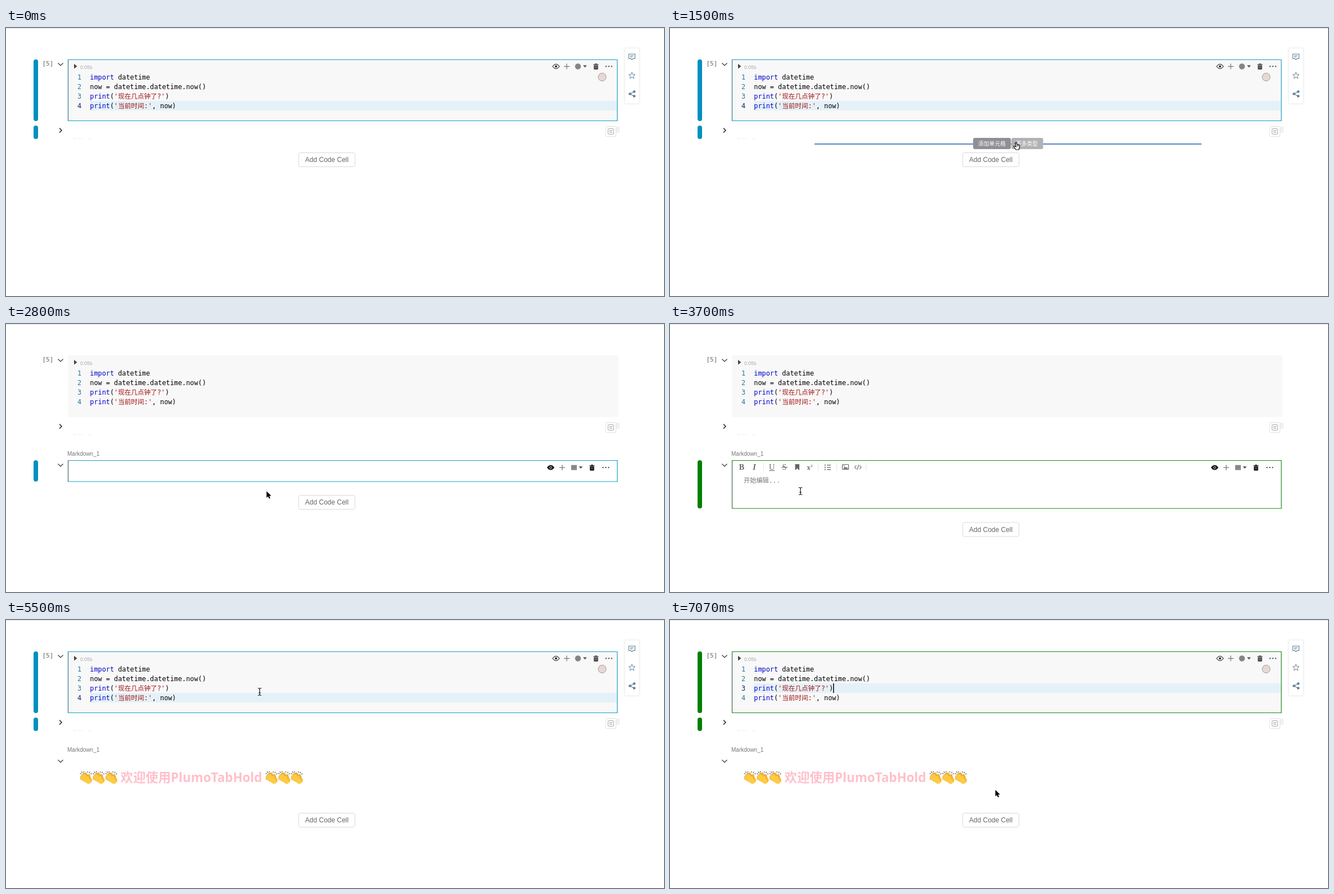
These frames come from a looping animation (1170x478 px, 7230 ms). An HTML page with a canvas:

```html
<!DOCTYPE html>
<html lang="zh">
<head>
<meta charset="utf-8">
<style>
html, body { margin: 0; width: 100%; height: 100%; overflow: hidden; background: #fff; }
canvas { display: block; width: 1170px; height: 478px; }
</style>
</head>
<body>
<canvas id="stage"></canvas>
<script>
const W = 1170, H = 478, LOOP = 7230;
const BLUE = '#0090c0', GREEN = '#008000', GRAY = '#666';
const SANS = '"Liberation Sans", sans-serif';
const MONO = '"DejaVu Sans Mono", monospace';
const SERIF = '"Liberation Serif", serif';
const CJK = '"Noto Sans CJK SC", "Noto Sans CJK", sans-serif';
const NAME = 'PlumoTabHold';

const canvas = document.getElementById('stage');
const g = canvas.getContext('2d');
const dpr = window.devicePixelRatio || 1;
canvas.width = W * dpr;
canvas.height = H * dpr;

// ---------- drawing helpers ----------
function text(s, x, y, font, color, align = 'left') {
  g.font = font;
  g.fillStyle = color;
  g.textAlign = align;
  g.fillText(s, x, y);
  return x + g.measureText(s).width;
}

// Latin and Chinese runs in one line; returns the end x.
function mixed(s, x, y, color, latin, cjk) {
  for (const part of s.split(/([\u3000-\u9fff]+)/)) {
    if (part) x = text(part, x, y, /[\u3000-\u9fff]/.test(part) ? cjk : latin, color);
  }
  return x;
}

function rect(x, y, w, h, color) {
  g.fillStyle = color;
  g.fillRect(x, y, w, h);
}

function box(x, y, w, h, r, fill, stroke, lw = 1) {
  g.beginPath();
  g.roundRect(x, y, w, h, r);
  if (fill) { g.fillStyle = fill; g.fill(); }
  if (stroke) { g.strokeStyle = stroke; g.lineWidth = lw; g.stroke(); }
}

function path(points, color, lw, fill) {
  g.beginPath();
  points.forEach(([x, y], i) => i ? g.lineTo(x, y) : g.moveTo(x, y));
  if (fill) { g.closePath(); g.fillStyle = fill; g.fill(); }
  if (color) { g.strokeStyle = color; g.lineWidth = lw; g.stroke(); }
}

function disc(x, y, r, fill, stroke, lw = 1) {
  g.beginPath();
  g.arc(x, y, r, 0, Math.PI * 2);
  if (fill) { g.fillStyle = fill; g.fill(); }
  if (stroke) { g.strokeStyle = stroke; g.lineWidth = lw; g.stroke(); }
}

function at(x, y, scale, draw) {
  g.save();
  g.translate(x, y);
  g.scale(scale, scale);
  draw();
  g.restore();
}

// ---------- icons ----------
const chevronDown = y => path([[92.5, y - 2], [97, y + 2.5], [101.5, y - 2]], '#333', 1.2);
const chevronRight = y => path([[95, y - 4], [99, y], [95, y + 4]], '#222', 1.5);

function eye(x, y, solid) {
  g.beginPath();
  g.moveTo(x - 6, y);
  g.quadraticCurveTo(x, y - 8, x + 6, y);
  g.quadraticCurveTo(x, y + 8, x - 6, y);
  if (solid) { g.fillStyle = '#111'; g.fill(); }
  g.strokeStyle = '#222';
  g.lineWidth = 1.2;
  g.stroke();
  disc(x, y, 1.9, solid ? '#111' : '#222', solid ? '#fff' : null, .8);
}

function trash(x, y, color) {
  rect(x - 4.5, y - 4, 9, 1.4, color);
  rect(x - 1.7, y - 5.2, 3.4, 1.5, color);
  box(x - 3.8, y - 2, 7.6, 7.4, 1, color);
  rect(x - 1.6, y - .5, .7, 4, '#bbb');
  rect(x + .9, y - .5, .7, 4, '#bbb');
}

function actions(xs, y, markdown) {
  const [e, p, lang, tri, bin, dots] = xs;
  eye(e, y, markdown);
  path([[p - 5, y], [p + 5, y]], '#666', 1.1);
  path([[p, y - 5], [p, y + 5]], '#666', 1.1);
  if (markdown) box(lang - 5, y - 4.5, 10, 9, 0, '#888');
  else disc(lang, y, 5.2, '#858585');
  path([[tri - 3.5, y - 2], [tri + 3.5, y - 2], [tri, y + 2]], null, 0, '#555');
  trash(bin, y, markdown ? '#111' : '#444');
  for (let i = -1; i < 2; i++) disc(dots + i * 5, y, 1.15, '#444');
}

function sidePanel() {
  const c = '#5f7f95';
  g.save();
  g.shadowColor = 'rgba(0,0,0,.08)';
  g.shadowBlur = 4;
  box(1100, 36, 26, 99, 2, '#fff');
  g.restore();
  box(1100, 36, 26, 99, 2, null, '#eee');
  path([[1107.5, 46.5], [1118.5, 46.5], [1118.5, 54.5], [1115, 54.5], [1113, 56.5],
    [1111, 54.5], [1107.5, 54.5], [1107.5, 46]], c, 1.1);
  path([[1110, 49.5], [1116, 49.5]], c, 1);
  path([[1110, 51.7], [1114, 51.7]], c, 1);
  const star = Array.from({ length: 11 }, (_, i) => {
    const r = i % 2 ? 2.8 : 6, a = i * Math.PI / 5 - Math.PI / 2;
    return [1113 + r * Math.cos(a), 85 + r * Math.sin(a)];
  });
  path(star, c, 1);
  path([[1117, 113.5], [1109.5, 117.5], [1117, 121.5]], c, 1.2);
  for (const [x, y] of [[1117, 113.5], [1109.5, 117.5], [1117, 121.5]]) disc(x, y, 2.3, c);
}

// Clapping hands inside a 22-unit square.
function clap(x, y, size) {
  at(x, y, size / 22, () => {
    g.lineCap = 'round';
    const hand = (dx, dy, fill, edge) => {
      const fingers = [[2.5, 12], [3, 8.8], [5.2, 6.4], [8.2, 5.6]];
      for (const [lw, c] of [[4, edge], [2.9, fill]]) {
        fingers.forEach(([fx, fy], i) =>
          path([[fx + dx, fy + dy], [12 + dx + i, 17 + dy - i]], c, lw));
        path([[14 + dx, 8.5 + dy], [15.5 + dx, 14 + dy]], c, lw);
      }
      g.beginPath();
      g.ellipse(14 + dx, 16 + dy, 6, 4.6, .75, 0, Math.PI * 2);
      g.fillStyle = fill;
      g.fill();
    };
    hand(2, -1, '#f5b52e', '#d9921e');
    hand(0, 1, '#ffcb45', '#e6a32b');
    for (const [a, b, c, d] of [[1, 4, 2.6, 5], [3.4, 1, 4.6, 2.8], [7, .6, 7.2, 2.2],
      [14, .8, 13.5, 2.4], [17.6, 1.6, 16.6, 3.2], [20.8, 4.4, 19.2, 5.2]])
      path([[a, b], [c, d]], '#555', 1.1);
    g.lineCap = 'butt';
  });
}

const claps = (x, y, size, step) => { for (let i = 0; i < 3; i++) clap(x + i * step, y, size); };

// ---------- page parts ----------
function addButton(y) {
  box(520.5, y + .5, 100, 25, 3, '#fff', '#d9d9d9');
  text('Add Code Cell', 570.5, y + 17, '12px ' + SANS, GRAY, 'center');
}

function codeCell(color, active, caret) {
  const latin = '11.83px ' + MONO, cjk = '11.6px ' + CJK;
  rect(110, 56, color ? 977 : 979, 110, '#f8f8f8');
  if (color) {
    rect(149, 62 + active * 17, 937, 17, '#e4f1f8');
    box(110.5, 56.5, 976.5, 109, 0, null, color === BLUE ? '#1b9fc6' : '#168a16', 1.2);
    rect(110, 57, 1, 109, color === BLUE ? '#3a7285' : '#556055');
    box(49, 56, 8, 110, 4, color);
    box(49, 174, 8, 24, 4, color);
    actions([978, 997, 1017, 1029.5, 1049, 1072], 68.5, false);
    disc(1060, 87.5, 7, '#e6d8d6', '#a89694');
  }
  text('[5]', 64.5, 67, '11px ' + MONO, '#666');
  chevronDown(64.5);
  path([[121, 64], [126.5, 68.3], [121, 72.6]], null, 0, '#444');
  text('0.05s', 132, 72.5, '8.8px ' + SANS, '#aaa');

  const K = '#0000c8', S = '#a31515', N = '#000';
  const lines = [
    [['import', K], [' datetime', N]],
    [['now = datetime.datetime.now()', N]],
    [['print', K], ['(', N], ["'现在几点钟了?'", S], [')', N]],
    [['print', K], ['(', N], ["'当前时间:'", S], [', now)', N]]
  ];
  lines.forEach((line, i) => {
    const y = 91.5 + i * 17;
    text(i + 1, 134, y, latin, color && i + 1 === active ? '#0b216f' : '#237893', 'right');
    let x = 149.3;
    for (const [s, c] of line) x = mixed(s, x, y, c, latin, cjk);
  });
  if (caret) rect(290, 113, 1.5, 17, '#000');

  // collapsed output row
  chevronRight(182.5);
  rect(1085, 176, 6, 11, '#f1f1f1');
  box(1066.5, 175.5, 18, 18, 2, '#fff', '#e0e0e0');
  box(1070.5, 179.5, 10, 10, 1, null, '#aaa');
  for (const d of [-3, 3]) path([[1075.5 - 3, 184.5 - d], [1075.5 + 3, 184.5 + d]], '#aaa', 1);
  disc(1075.5, 184.5, 1.8, '#fff', '#aaa');
  g.save();
  g.beginPath();
  g.rect(110, 195, 60, 3);
  g.clip();
  text('当前时间', 115.5, 206.5, '11.4px ' + CJK, '#bbb');
  g.restore();
}

function heading(y) {
  claps(131, y - 19.5, 22.5, 22.5);
  mixed('欢迎使用' + NAME, 203.5, y, '#ffc0cb',
    'bold 22.4px "Noto Sans", sans-serif', 'bold 22.4px ' + CJK);
  claps(461, y - 19.5, 22.5, 22.5);
}

function toolbar() {
  const c = '#666', y = 260;
  text('B', 127.5, y, 'bold 14px ' + SERIF, c, 'center');
  text('I', 150, y, 'italic bold 14px ' + SERIF, c, 'center');
  text('U', 181, y - .5, '14px ' + SERIF, c, 'center');
  rect(176, 261, 10, 1, c);
  text('S', 203.5, y, '14px ' + SERIF, c, 'center');
  rect(198, 255, 11, 1, c);
  path([[222.5, 250], [230, 250], [230, 261], [226.2, 257.5], [222.5, 261]], null, 0, c);
  text('x', 243.5, y - .5, 'bold 12px ' + SERIF, c);
  text('2', 250, y - 5, 'bold 7px ' + SERIF, c);
  for (let i = 0; i < 3; i++) {
    rect(279, 251 + i * 4, 7, 1.3, c);
    rect(275, 250.5 + i * 4, 1.5, 2.4, c);
  }
  box(306.5, 250.5, 11, 9, 1, null, c, 1.2);
  path([[308, 258.5], [311, 254.5], [313, 256.5], [314.5, 255], [316.5, 258.5]], null, 0, c);
  disc(309.5, 253, 1, c);
  path([[331.5, 252], [328.5, 255.5], [331.5, 259]], c, 1.1);
  path([[335.5, 251], [333, 260]], c, 1.1);
  path([[337, 252], [340, 255.5], [337, 259]], c, 1.1);
  for (const x of [166, 263, 296, 348]) rect(x, 248, 1, 14, '#e4e4e4');
}

function markdownCell(mode) {
  text('Markdown_1', 109, 235, '10px ' + SANS, '#777');
  chevronDown(251.5);
  if (mode === 'shown') return heading(289);

  const bottom = { empty: 281, edit: 329, filled: 370 }[mode];
  const color = mode === 'empty' ? BLUE : GREEN;
  box(49, 243, 8, bottom - 243, 4, color);
  box(110.5, 243.5, 976.5, bottom - 243.5, 0, '#fff', mode === 'empty' ? '#1b9fc6' : '#168a16', 1.2);
  rect(110, 244, 1, bottom - 244, '#556055');
  actions([968.5, 989, 1010, 1022, 1042, 1066.5], 256, true);
  if (mode === 'empty') return;

  toolbar();
  const latin = '11.2px ' + MONO, cjk = '11.2px ' + CJK;
  if (mode === 'edit') {
    mixed('开始编辑...', 131, 283, '#777', latin, cjk);
    return;
  }
  rect(110, bottom - .6, 977, 1.2, '#606060');
  text('#', 131, 283, latin, '#333');
  claps(145, 270.5, 14.4, 14.4);
  mixed('<b style="color:pink"> 欢迎使用' + NAME + ' </b>', 188, 283, '#333', latin, cjk);
  claps(503.5, 270.5, 14.4, 14.4);
  heading(339);
}

function insertBar(hover) {
  rect(257, 206, 688, 1.8, '#4479c0');
  box(539, 196, 67, 20, 3, '#8f9095');
  box(607, 196, 56.5, 20, 3, hover ? '#b1b2b4' : '#97989c');
  text('添加单元格', 572.5, 209.7, '9.8px ' + CJK, '#fff', 'center');
  text('更多类型', 634.5, 209.7, '9.8px ' + CJK, '#fff', 'center');
}

const MENU = [
  [449, 'Code', 'Python,SQL,Markdown'],
  [525.5, 'Data Display', 'Chart,Table,自助分析,EDA分析,EDA概览'],
  [601.3, 'Data Transform', '数据透视表'],
  [715.5, 'Input', '下拉框,文本框,标签页,单选框,时间日期,按钮'],
  [791.5, 'ML/AI', '降维,聚类,分类,回归']
];

function menu(hover) {
  g.save();
  g.shadowColor = 'rgba(0,0,0,.45)';
  g.shadowBlur = 7;
  g.shadowOffsetY = 1;
  box(434.5, 226, 400.5, 168, 3, '#fff');
  g.restore();
  path([[628, 227], [634.5, 221], [641, 227]], null, 0, '#fff');
  if (hover) rect(445, 296, 75, 21, '#eceffa');
  const head = '10.4px ' + SANS;
  const item = (s, x, y) => mixed(s, x, y + 4.2, '#333', '12px ' + SANS, '11.2px ' + CJK);
  for (const [x, title, items] of MENU) {
    text(title, x, 247.5, head, '#777');
    items.split(',').forEach((s, i) => item(s, x, 262 + i * 22.15));
  }
  text('FaaS API', 601.3, 291, head, '#777');
  ['HelloAPI', '查询Demo', '预测Demo'].forEach((s, i) => item(s, 601.3, 310.3 + i * 22.1));
}

// ---------- pointer ----------
const MOVES = [
  [100, 650, 458, 'arrow'], [800, 604, 250, 'arrow'], [1100, 606, 213, 'hand'],
  [1500, 616, 206, 'hand'], [1700, 616, 206, 'hand'], [1900, 612, 212, 'arrow'],
  [2300, 485, 303, 'hand'], [2500, 485, 303, 'hand'], [2700, 485, 303, 'arrow'],
  [3200, 276, 258, 'arrow'], [3400, 276, 258, 'beam'], [3500, 232, 298, 'beam'],
  [4000, 232, 298, 'beam'], [4400, 205, 225, 'arrow'], [4700, 200, 195, 'arrow'],
  [4900, 200, 195, 'arrow'], [5100, 270, 170, 'beam'], [5500, 451, 128, 'beam'],
  [5900, 451, 124, 'beam'], [6100, 500, 190, 'arrow'], [6400, 578.5, 303, 'arrow']
];
const CLICKS = [1700, 2500, 3200, 3500, 4800, 5700];

function pointerAt(t) {
  const i = MOVES.findLastIndex(m => m[0] <= t);
  if (i < 0) return null;
  const a = MOVES[i], b = MOVES[i + 1] || a;
  const k = b === a ? 0 : (t - a[0]) / (b[0] - a[0]);
  const e = k * k * (3 - 2 * k);
  return { x: a[1] + (b[1] - a[1]) * e, y: a[2] + (b[2] - a[2]) * e, kind: a[3] };
}

const SHAPES = {
  arrow() {
    path([[0, 0], [0, 11.5], [2.7, 9.2], [4.6, 13.3], [6.6, 12.4], [4.8, 8.4], [8.3, 8.2]],
      '#fff', 1.6, '#000');
    path([[0, 0], [0, 11.5], [2.7, 9.2], [4.6, 13.3], [6.6, 12.4], [4.8, 8.4], [8.3, 8.2]],
      null, 0, '#000');
  },
  hand() {
    path([[-1.6, -1], [0, -1.6], [1.2, 2], [3, 1.6], [4, 2.6], [5, 2.4], [5.8, 4], [5.2, 8],
      [4.2, 11], [-1, 11], [-4.8, 5.6], [-4, 4.4], [-.8, 6], [-1.9, 0], [-1.4, -1.2]],
      '#111', 1.2, '#fff');
    path([[1, 2.5], [1.6, 5.5]], '#111', .8);
    path([[3, 2.8], [3.4, 5.5]], '#111', .8);
  },
  beam() {
    path([[0, -5.5], [0, 5.5]], '#111', 1.2);
    for (const s of [-1, 1])
      path([[-3.2, 6.5 * s], [-1.2, 6.3 * s], [0, 5.3 * s], [1.2, 6.3 * s], [3.2, 6.5 * s]], '#111', 1.1);
    path([[-1.8, 2], [1.8, 2]], '#111', 1);
  }
};

function pointer(t) {
  const p = pointerAt(t);
  if (!p) return;
  const click = CLICKS.find(c => t >= c && t < c + 200);
  if (click) disc(p.x + .5, p.y + .8, t < click + 100 ? 16.3 : 11.5, null, '#000', 2.3);
  at(p.x, p.y, 1, SHAPES[p.kind]);
}

// ---------- timeline ----------
const within = (t, a, b) => t >= a && t < b;

function draw(t) {
  g.setTransform(dpr, 0, 0, dpr, 0, 0);
  rect(0, 0, W, H, '#fff');
  rect(0, 0, W, 1, '#e2e2e2');

  const mode = t < 2700 ? null : t < 3400 ? 'empty' : t < 3900 ? 'edit' : t < 4900 ? 'filled' : 'shown';
  const away = within(t, 2700, 4900);
  const editing = t >= 5800;
  const caret = editing && !within(t, 6600, 6900);
  codeCell(away ? null : editing ? GREEN : BLUE, editing ? 3 : 4, caret);
  if (!away) sidePanel();
  if (mode) markdownCell(mode);
  addButton(mode ? { empty: 305, edit: 353.5, filled: 394, shown: 344 }[mode] : 222);
  if (within(t, 1000, 2700) || within(t, 4600, 4900)) insertBar(within(t, 1400, 1900));
  if (within(t, 1800, 2700)) menu(t >= 2300);
  pointer(t);
}

function frame(now) {
  const t = now % LOOP;
  draw(Math.floor(t / 100) * 100);
  requestAnimationFrame(frame);
}
requestAnimationFrame(frame);
</script>
</body>
</html>
```
